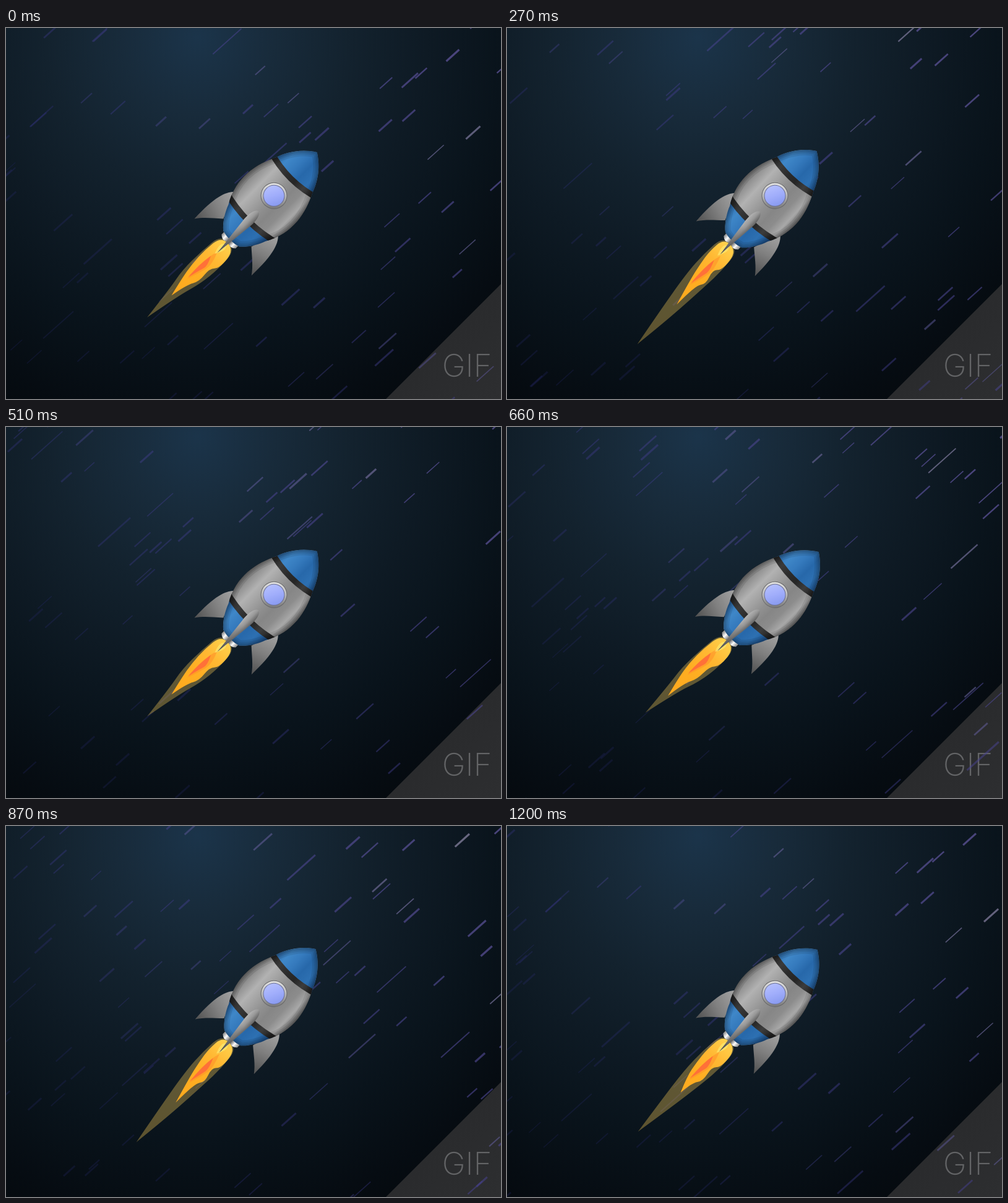
An HTML page with a canvas for the animation above (1230 ms loop, 800 by 600 pixels).

```html
<!DOCTYPE html>
<html lang="en">
<head>
<meta charset="utf-8">
<title>Rocket</title>
<style>
  html, body { margin: 0; width: 100%; height: 100%; overflow: hidden; background: #060b10; }
  canvas { display: block; }
</style>
</head>
<body>
<canvas id="stage" width="800" height="600"></canvas>
<script>
const ctx = document.getElementById('stage').getContext('2d');
const LOOP = 1230, STEP = 30;
const DIR = { x: -0.745, y: 0.667 };

function seeded(seed) {
  return () => {
    seed = (seed * 1664525 + 1013904223) >>> 0;
    return seed / 4294967296;
  };
}

const random = seeded(77);
const stars = Array.from({ length: 235 }, () => ({
  phase: random(),
  across: (random() - 0.5) * 1000,
  travel: 1200 + 400 * random(),
  length: 20 + 20 * random() + (random() < 0.1 ? 30 : 0),
  width: 1.4 + 1.9 * random(),
  pale: random()
}));

function gradient(g, ...stops) {
  stops.forEach((color, i) => g.addColorStop(i / (stops.length - 1), color));
  return g;
}
const linear = (x0, y0, x1, y1, ...stops) =>
  gradient(ctx.createLinearGradient(x0, y0, x1, y1), ...stops);
const radial = (x, y, r, ...stops) =>
  gradient(ctx.createRadialGradient(x, y, 0, x, y, r), ...stops);

const sky = radial(310, 15, 740,
  '#1b344a', '#182b3b', '#13222e', '#0e1a24', '#09131b', '#060c12', '#04070a');
const corner = linear(707, 507, 800, 600, '#2a2b2d', '#2d2e30');
const steel = linear(-58, 0, 58, 0,
  '#747474', '#959595', '#b2b2b2', '#a2a2a2', '#919191', '#868686', '#8c8c8c', '#a8a8a8', '#6a6a6a');
const blue = linear(-42, 0, 42, 0, '#2b6aab', '#3f87c8', '#357abd', '#2768aa', '#2d70b2', '#1d5594');
const finSteel = linear(-45, 45, -66, 112, '#a2a2a2', '#808080', '#555555');
const keelSteel = linear(-8, 0, 8, 0, '#b4b4b4', '#979797', '#606060');
const keelShade = linear(0, 70, 0, 130, 'rgba(50,50,50,0)', 'rgba(50,50,50,.75)');
const nozzleSteel = linear(-15, 0, 15, 0, '#999', '#fff', '#888', '#777', '#fff', '#999');
const bandSteel = linear(-42, 0, 42, 0, '#262626', '#3a3a3a', '#2c2c2c', '#262626', '#3c3c3c', '#222222');
const rim = linear(-15, -15, 15, 15, '#e4e4e4', '#b9b9b9', '#777777');
const glass = linear(-16, -8, 16, 8, '#b5c0ff', '#a0adfb', '#8799ef');
const fire = linear(0, 106, 0, 250, '#ffd34e', '#ffb833', '#ffae22', '#ffab1f', '#ffa51c');

const body = new Path2D(`M0-99 C-24-84-36-62-41-47 C-56-18-66 22-42 62
  C-38 74-28 90-18 98 Q0 103 18 98 C28 90 38 74 42 62
  C66 22 56-18 41-47 C36-62 24-84 0-99Z`);
const fin = new Path2D('M-48 39 C-59 48-67 66-65 117 C-56 104-45 96-32 84Z');
const keel = new Path2D('M0 35 C7 38 9 52 7 66 C5 88 2 108 0 130 C-2 108-5 88-7 66 C-9 52-7 38 0 35Z');
const nozzle = new Path2D('M-16 95 L-16 104 Q-9 111-2 106 L2 106 Q9 111 16 104 L16 95Z');

function fill(style, path) {
  ctx.fillStyle = style;
  path ? ctx.fill(path) : ctx.fill();
}

function disc(r, style) {
  ctx.beginPath();
  ctx.arc(0, 0, r, 0, Math.PI * 2);
  fill(style);
}

// Rounded line that ends exactly on the last point.
function curve(points) {
  ctx.lineTo(...points[0]);
  for (let i = 1; i < points.length - 1; i++) {
    const [x, y] = points[i], [nx, ny] = points[i + 1];
    const last = i === points.length - 2;
    ctx.quadraticCurveTo(x, y, last ? nx : (x + nx) / 2, last ? ny : (y + ny) / 2);
  }
}

function tongue(left, tip, right, style) {
  ctx.beginPath();
  curve([...left, tip]);
  curve([tip, ...right, left[0]]);
  ctx.closePath();
  fill(style);
}

const blend = (a, b, p) => a.map(([x, y], i) => [x + (b[i][0] - x) * p, y + (b[i][1] - y) * p]);

// Flame outlines at both ends of the swing.
const fireLeft = [
  [[0, 107], [-13, 107], [-16, 138], [-13, 162], [-8, 190]],
  [[0, 107], [-15, 107], [-20, 145], [-21, 185], [-16, 216]]
];
const fireRight = [
  [[5, 193], [16, 181], [8, 156], [20, 146], [16, 107]],
  [[-4, 214], [6, 188], [10, 158], [21, 143], [16, 107]]
];
const ember = [
  [[-1, 143], [-5, 165], [-3, 196], [3, 173], [6, 160]],
  [[-8, 138], [-12, 160], [-10, 184], [-5, 164], [1, 150]]
];
const glowTips = [[1, 327], [-5, 314], [-7, 284], [-10, 283], [-14, 284], [-18, 292]];
const fireTips = [[4, 237], [1, 221], [-4, 231], [-4, 238], [-9, 248], [-13, 255]];

function drawBackdrop() {
  ctx.fillStyle = sky;
  ctx.fillRect(0, 0, 800, 600);
  ctx.beginPath();
  ctx.moveTo(614, 600);
  ctx.lineTo(800, 414);
  ctx.lineTo(800, 600);
  fill(corner);
  ctx.font = '200 51px Inter, Roboto, sans-serif';
  ctx.textAlign = 'center';
  ctx.fillStyle = '#636466';
  ctx.fillText('GIF', 745, 564);
}

function drawStars(t) {
  for (const s of stars) {
    const along = ((s.phase + t / LOOP) % 1 - 0.5) * s.travel;
    const x = 400 + DIR.x * along + DIR.y * s.across;
    const y = 300 + DIR.y * along - DIR.x * s.across;
    const near = Math.max(0, Math.min(1, 0.25 + x / 900 - y / 1100));
    const pale = s.pale > 0.8 ? near : near * 0.5;
    ctx.strokeStyle = `hsl(${240 + 8 * near} ${46 - 34 * pale}% ${36 + 18 * pale}%)`;
    ctx.globalAlpha = 0.2 + 0.6 * near;
    ctx.lineWidth = s.width;
    ctx.beginPath();
    ctx.moveTo(x, y);
    ctx.lineTo(x - DIR.x * s.length, y - DIR.y * s.length);
    ctx.stroke();
  }
  ctx.globalAlpha = 1;
}

function drawFlame(pose) {
  const p = pose / 5;
  const [gx, gy] = glowTips[pose];
  tongue([[0, 105], [-16, 105], [-20, 145], [-19 + gx * 0.2, 190], [gx * 0.7 - 9, gy - 60]],
    [gx, gy],
    [[gx * 0.7 + 9, gy - 60], [17 + gx * 0.2, 185], [20, 145], [17, 105]],
    'rgba(255,208,90,.34)');
  tongue(blend(...fireLeft, p), fireTips[pose], blend(...fireRight, p), fire);
  const [a, b, c, d, e] = blend(...ember, p);
  tongue([[a[0] + 3, a[1] - 12], [b[0] - 2, b[1] - 8]], [c[0] + 1, c[1] + 3],
    [[d[0] + 3, d[1] + 3], [e[0] + 4, e[1] - 6]], 'rgba(255,145,40,.55)');
  tongue([a, b], c, [d, e], '#ff7038');
  tongue([[0, 110], [-10, 114]], [-2, 134], [[10, 115]], 'rgba(255,238,120,.6)');
}

function band(y, sag) {
  ctx.beginPath();
  ctx.moveTo(-62, y);
  ctx.quadraticCurveTo(0, y + 2 * sag, 62, y);
}

// Fills the hull from the band line towards the given end.
function cap(y, sag, end) {
  band(y, sag);
  ctx.lineTo(62, end);
  ctx.lineTo(-62, end);
  fill(blue);
  band(y, sag);
  ctx.strokeStyle = bandSteel;
  ctx.lineWidth = 9.5;
  ctx.stroke();
}

function drawHull() {
  fill(nozzleSteel, nozzle);
  for (const side of [1, -1]) {
    ctx.save();
    ctx.scale(side, 1);
    fill(finSteel, fin);
    ctx.restore();
  }
  ctx.save();
  ctx.clip(body);
  fill(steel, body);
  cap(-50, 11, -110);
  cap(49, 9, 110);
  ctx.strokeStyle = 'rgba(0,0,0,.09)';
  for (const width of [3, 7, 12, 18]) {
    ctx.lineWidth = width;
    ctx.stroke(body);
  }
  ctx.restore();

  disc(21.5, '#686868');
  disc(20.5, rim);
  disc(17.5, '#6c7196');
  disc(16.5, glass);
  fill(keelSteel, keel);
  fill(keelShade, keel);
}

function draw(now) {
  const frame = Math.floor((now % LOOP) / STEP);
  const t = frame * STEP || LOOP;
  // The rocket swings back and forth once every ten steps.
  const pose = 5 - Math.abs((t / STEP + 1) % 10 - 5);
  drawBackdrop();
  drawStars(t);
  ctx.save();
  ctx.translate(433, 271.3);
  ctx.rotate((43 + 0.88 * pose) * Math.PI / 180);
  drawFlame(pose);
  drawHull();
  ctx.restore();
}

const start = performance.now();
function tick() {
  draw(performance.now() - start);
  requestAnimationFrame(tick);
}
tick();
</script>
</body>
</html>
```
